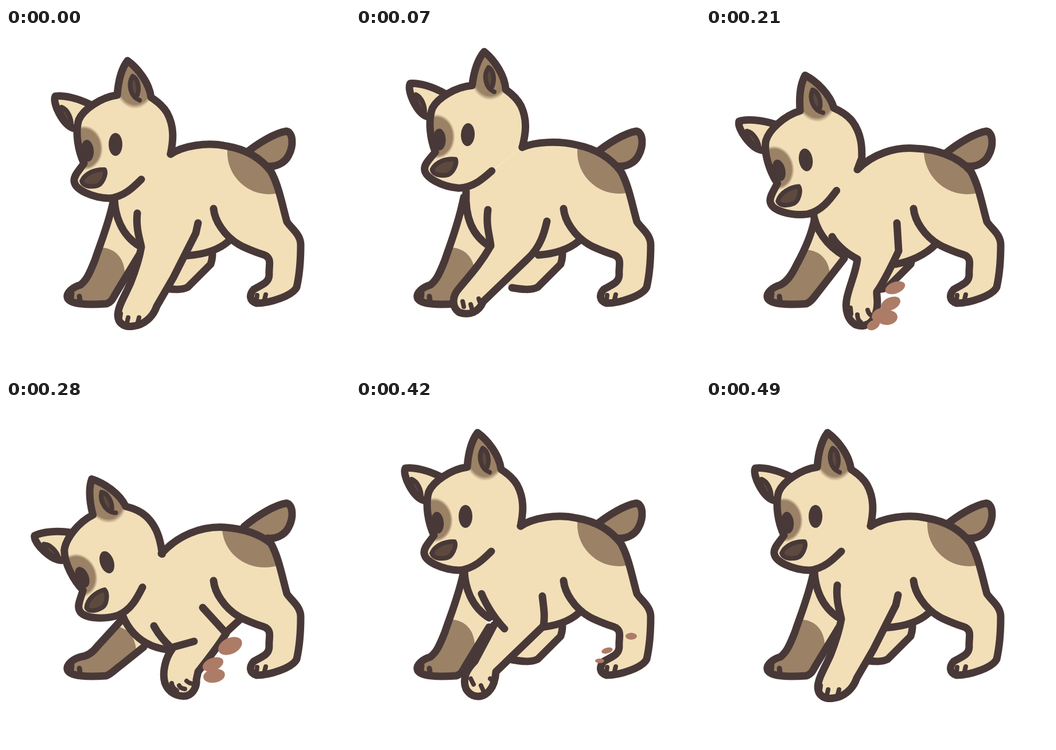
Animation, 600 px wide and 600 px high, one loop 560 ms. Source, as an HTML page:

```html
<!DOCTYPE html>
<html lang="en">
<head>
<meta charset="utf-8">
<title>Digging puppy</title>
<style>
  html, body { margin: 0; width: 100%; height: 100%; overflow: hidden; background: #fff; }
  svg { display: block; width: 100%; height: 100%; }
</style>
</head>
<body>
<svg id="stage" viewBox="0 0 600 600"></svg>
<script>
const STEP = 70;
const LINE = '#483938', CREAM = '#f2dfb8', BROWN = '#9b8165', DARK = '#5d493e', DUST = '#ad7c67';
const stage = document.getElementById('stage');

const shape = (d, fill = 'none', width = 13) =>
  `<path d="${d}" fill="${fill}" stroke="${LINE}" stroke-width="${width}"/>`;
const area = (d, fill = CREAM) => `<path d="${d}" fill="${fill}"/>`;
const oval = (x, y, rx, ry, turn = 0, fill = LINE, extra = '') =>
  `<ellipse cx="${x}" cy="${y}" rx="${rx}" ry="${ry}" transform="rotate(${turn} ${x} ${y})" fill="${fill}" ${extra}/>`;
const clip = (id, d) => `<clipPath id="${id}"><path d="${d}"/></clipPath>`;

const HEAD = 'M287 220C292 196 294 172 281 148C274 136 264 128 253 121C250 96 230 70 212 57' +
  'C202 70 196 90 194 117C165 121 135 142 127 160C120 182 126 215 136 236' +
  'C128 248 117 258 119 268C121 282 150 296 180 297C205 295 222 278 236 264';
const HIND = 'C476 275 482 310 490 338C498 350 514 360 514 378C514 400 512 430 507 452' +
  'C500 467 460 480 437 480C424 476 424 465 432 456C445 448 459 445 459 430' +
  'C458 415 464 404 453 397C420 385 395 378 375 348C366 335 363 325 362 315';
const FOOT = 'C116 452 105 462 107 470C110 483 145 483 175 481';
const TAIL = 'M415 221C440 200 470 183 489 180C501 182 502 205 493 222C486 236 470 243 456 241';

const body = {
  up: {
    nape: '290 208', back: 'C312 199 350 196 385 204C415 210 442 224 462 250',
    chest: 'M192 285C190 325 200 360 232 380', belly: 'M318 396C345 394 370 387 388 372',
    far: ['M188 295C178 345 163 380 155 405C145 430 140 440 130 448', 'C185 478 187 470 192 462L232 396'],
    sock: [0, 0], patch: [459, 216, 73, 73]
  },
  rest: {
    nape: '287 220', back: 'C308 206 350 198 385 206C415 211 442 224 462 250',
    chest: 'M189 298C190 325 200 360 232 380', belly: 'M316 397C345 395 370 388 388 372',
    far: ['M187 303C178 345 163 380 155 405C145 430 140 440 130 448', 'C185 478 187 470 192 462L232 396'],
    sock: [0, 0], patch: [459, 217, 73, 73]
  },
  mid: {
    nape: '270 231', back: 'L264 247C290 220 330 207 365 210C398 211 438 222 462 250',
    chest: 'M187 321C190 350 210 380 242 398', belly: 'M330 412C355 408 382 396 400 378',
    far: ['M189 335C183 365 169 393 158 413C149 432 141 442 130 448', 'C184 477 188 470 196 460L241 402'],
    sock: [9, 4], patch: [456, 214, 76, 76]
  },
  low: {
    nape: '271 268', back: 'C300 236 340 220 380 222C410 224 440 232 462 250',
    chest: 'M203 375C215 405 240 432 287 436', belly: 'M384 405L408 383',
    far: ['M202 383L159 430C150 442 140 447 130 448', 'C185 477 190 470 200 463L240 431'],
    sock: [20, 11], patch: [451, 222, 74, 70]
  }
};

// near front leg: outline, then toe marks
const leg = {
  lift: ['M230 317C226 345 234 365 235 380C215 415 195 435 179 455C166 470 168 488 180 496' +
    'C198 502 214 496 222 477L300 402C322 382 329 355 333 337', 'M186 477L188 486M200 482L202 489M214 472L216 478'],
  stand: ['M229 323C226 350 234 370 236 382C232 405 225 425 217 445C207 468 196 484 195 500' +
    'C195 518 210 522 222 520C240 518 256 505 263 485L292 435L331 358L335 340',
    'M200 498L199 505M213 505L211 514M232 505L230 513'],
  pull: ['M219 338C228 360 245 385 259 399M241 392L207 456C190 473 186 490 192 504' +
    'C200 518 215 520 226 513C238 505 243 490 244 474L327 394C330 375 327 360 325 342',
    'M200 486L205 496M218 498L222 507M234 486L240 492'],
  push: ['M220 364C228 380 250 396 264 403C262 425 250 450 246 470C241 492 248 511 262 518' +
    'C276 523 292 515 296 498C302 480 297 470 298 460C312 440 325 412 336 389L333 340',
    'M252 488L253 499M264 500Q264 509 270 513M282 492Q284 500 290 502'],
  kick: ['M258 394C265 408 275 420 290 434C278 450 272 475 277 493C284 512 300 518 315 516' +
    'C328 512 333 498 332 488L335 474C350 455 370 430 384 407L343 362',
    'M289 494Q290 502 298 507M302 498Q304 503 312 504M315 490Q320 495 328 495']
};

// head: turn in degrees, then where the near eye sits
const head = { up: [3, 195, 186], rest: [0, 191, 203], mid: [-8.6, 174, 230], low: [-18.5, 176, 283] };

const rest = { body: 'rest', leg: 'stand', dust: [] };
const poses = [
  rest,
  { body: 'up', leg: 'lift', dust: [] },
  { body: 'rest', leg: 'pull', dust: [[267, 485, 14, 9, -10], [255, 492, 10, 7, -10], [240, 511, 15, 11, -15], [262, 505, 13, 10, -5]] },
  { body: 'mid', leg: 'push', dust: [[330, 453, 18, 10, -20], [322, 481, 18, 11, -25], [316, 505, 18, 13, -5], [292, 518, 12, 8, -30], [302, 500, 14, 10, -35]] },
  { body: 'low', leg: 'kick', dust: [[391, 429, 22, 14, -25], [361, 461, 19, 11, -22], [363, 481, 19, 12, -10]] },
  { body: 'mid', leg: 'push', dust: [[321, 471, 11, 8, -20], [402, 445, 16, 9, -22], [397, 462, 14, 7, 8], [449, 415, 17, 10, 0]] },
  { body: 'rest', leg: 'pull', dust: [[480, 412, 10, 6, 0], [438, 437, 10, 5, -15], [425, 455, 8, 4, 0]] },
  rest
];

const defs = ['soft', 'softEar'].map(id => `<radialGradient id="${id}">
  <stop offset=".85" stop-color="${BROWN}"/><stop offset="1" stop-color="${BROWN}" stop-opacity="0"/>
</radialGradient>`).join('') + clip('headClip', HEAD + 'Z');

function drawHead([turn, x, y]) {
  return `<g transform="translate(${x} ${y}) rotate(${turn}) translate(-191 -203)">` +
    shape('M148 134C125 122 100 117 86 119C80 131 100 170 118 175', CREAM) +
    shape('M97 138C94 148 103 164 114 169C114 158 108 142 97 138', DARK, 8) +
    area(HEAD + 'Z') +
    `<g clip-path="url(#headClip)">` + oval(225, 88, 38, 53, 0, 'url(#softEar)') +
    oval(137, 209, 32, 39, -5, 'url(#soft)') + '</g>' +
    shape(HEAD) +
    shape('M233 126C217 120 212 98 221 84C231 89 233 106 229 117', DARK, 8) +
    oval(191, 203, 12, 20) + oval(142, 214, 11, 19, -5) +
    shape('M132 267C138 253 156 246 172 247C176 256 167 273 159 275C148 278 134 276 132 267Z', DARK, 8) +
    '</g>';
}

function draw(pose) {
  const b = body[pose.body], [outline, toes] = leg[pose.leg];
  const back = `M${b.nape}${b.back}${HIND}`;
  const far = b.far[0] + FOOT + b.far[1];
  const torso = `${b.chest}L${b.belly.slice(1)}L420 300L${b.nape}Z`;
  const knee = 'M359 378C361 392 360 404 357 412L317 452C305 458 290 456 272 453';
  const [px, py, prx, pry] = b.patch;
  stage.innerHTML =
    `<defs>${defs}${clip('bodyClip', back + 'Z')}${clip('farClip', far + 'Z')}</defs>` +
    '<g stroke-linecap="round" stroke-linejoin="round">' +
    shape(TAIL, BROWN) +
    (pose.body === 'low' ? '' : area(knee + 'L250 440L310 385Z') + shape(knee)) +
    area(far + 'Z') +
    `<g clip-path="url(#farClip)"><path transform="translate(${b.sock})" fill="${BROWN}"
      d="M60 383H168C190 385 205 400 207 425V500H60Z"/></g>` +
    shape(far) + shape('M115 463L114 471M128 468L129 475', 'none', 9) +
    area(back + 'Z') + area(torso) +
    oval(px, py, prx, pry, 0, BROWN, 'clip-path="url(#bodyClip)"') +
    shape(b.belly) + shape(b.chest) +
    area(outline + 'Z') + shape(outline) + shape(toes, 'none', 8) +
    (pose.leg === 'kick' ? shape('M292 431L328 421') : '') +
    drawHead(head[pose.body]) +
    shape(back) + shape('M438 466L437 474M453 465L451 473', 'none', 8) +
    pose.dust.map(p => oval(...p, DUST)).join('') +
    '</g>';
}

let shown = -1;
function tick() {
  const step = Math.floor(performance.now() / STEP) % poses.length;
  if (step !== shown) draw(poses[shown = step]);
  requestAnimationFrame(tick);
}
tick();
</script>
</body>
</html>
```
